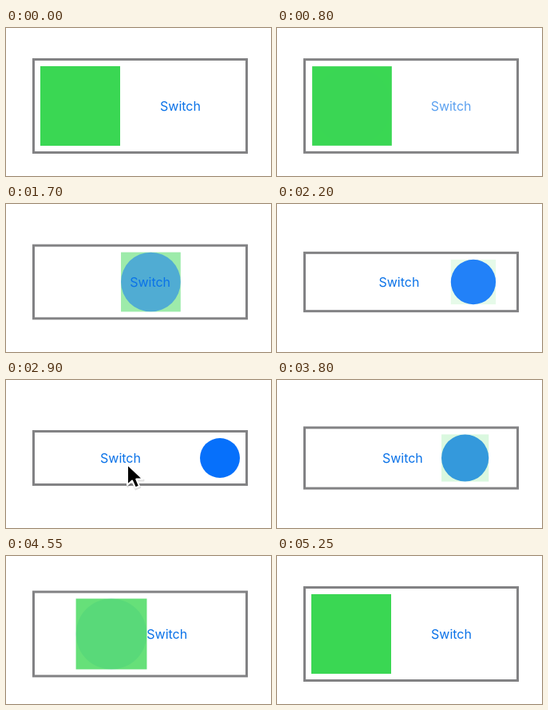
An HTML page for the animation above (5.45 s loop, 332 by 186 pixels).

```html
<!DOCTYPE html>
<html lang="en">
<head>
<meta charset="utf-8">
<title>Switch</title>
<style>
  html, body { margin: 0; width: 100%; height: 100%; overflow: hidden; background: #fff; }
  svg { display: block; width: 100vw; height: 100vh; }
  text { font: 400 16px Inter, "Liberation Sans", sans-serif; text-anchor: middle; fill: #0a72e8; }
</style>
</head>
<body>
<svg viewBox="0 0 332 186">
  <rect id="frame" x="34.5" width="267" fill="none" stroke="#828284" stroke-width="3"/>
  <g id="shapes">
    <rect id="square" fill="#3ad753"/>
    <circle id="circle" cy="98" fill="#0670fb"/>
  </g>
  <text id="label" y="104">Switch</text>
  <g id="cursor">
    <path d="M0 0V26L6 20.5L10 29.5L15 27.3L11.2 18.6H19.5Z" transform="translate(.5 1.5)"
      fill="none" stroke="#000" stroke-opacity=".12" stroke-width="3" stroke-linejoin="round"/>
    <path d="M0 0V26L6 20.5L10 29.5L15 27.3L11.2 18.6H19.5Z"
      fill="#000" stroke="#fff" stroke-width="2" stroke-linejoin="round"/>
  </g>
</svg>
<script>
const LOOP = 5450, DURATION = 2000, MID_Y = 98;
const FORWARD = 695, BACK = 3205;
const $ = id => document.getElementById(id);
const [frame, shapes, square, circle, label, cursor] =
  ["frame", "shapes", "square", "circle", "label", "cursor"].map($);

const clamp = v => Math.min(1, Math.max(0, v));
const mix = (a, b, k) => a + (b - a) * k;
const span = (t, from, to) => clamp((t - from) / (to - from));
const set = (el, attrs) => {
  for (const name in attrs) el.setAttribute(name, attrs[name]);
};

// cubic-bezier(.42, 0, .58, 1), solved by bisection
function easeInOut(x) {
  let lo = 0, hi = 1;
  for (let i = 0; i < 24; i++) {
    const s = (lo + hi) / 2, r = 1 - s;
    if (3 * r * r * s * 0.42 + 3 * r * s * s * 0.58 + s ** 3 < x) lo = s;
    else hi = s;
  }
  return lo * lo * (3 - 2 * lo);
}

const clicks = [
  { enter: 30, rest: 450, press: 500, release: 690, leave: 700, gone: 800,
    from: [238, 188], at: [224, 105], to: [236, 190] },
  { enter: 2680, rest: 2900, press: 3100, release: 3200, leave: 3230, gone: 3500,
    from: [194, 190], at: [152, 106], to: [186, 190] }
];

function drawCursor(t) {
  const c = clicks.find(k => t > k.enter && t < k.gone);
  cursor.style.display = c ? "" : "none";
  if (!c) return;
  const arrive = 1 - (1 - span(t, c.enter, c.rest)) ** 2;
  const depart = span(t, c.leave, c.gone) ** 2;
  const [x, y] = c.at.map((v, i) => mix(mix(c.from[i], v, arrive), c.to[i], depart));
  set(cursor, { transform: `translate(${x} ${y})` });
}

function labelOpacity(t) {
  const c = clicks.find(k => t >= k.press && t < k.release + 200);
  return c ? mix(0.25, 1, span(t, c.release, c.release + 200)) : 1;
}

function render(t) {
  const returning = t >= BACK;
  const start = returning ? BACK : FORWARD;
  const eased = easeInOut(span(t, start, start + DURATION));
  const p = returning ? 1 - eased : eased;

  const size = mix(100, 50, p), x = mix(93, 268, p), height = size + 20;
  set(frame, { y: MID_Y - height / 2 + 1.5, height: height - 3 });
  set(square, { x: x - size / 2, y: MID_Y - size / 2, width: size, height: size, opacity: 1 - p });
  set(circle, { cx: x, r: size / 2, opacity: p });

  // the incoming shape lies on top
  const top = returning ? square : circle;
  if (shapes.lastElementChild !== top) shapes.append(top);

  set(label, { x: mix(218.5, 143.5, p), opacity: labelOpacity(t) });
  drawCursor(t);
}

const began = performance.now();
function tick() {
  render((performance.now() - began) % LOOP);
  requestAnimationFrame(tick);
}
tick();
</script>
</body>
</html>
```
